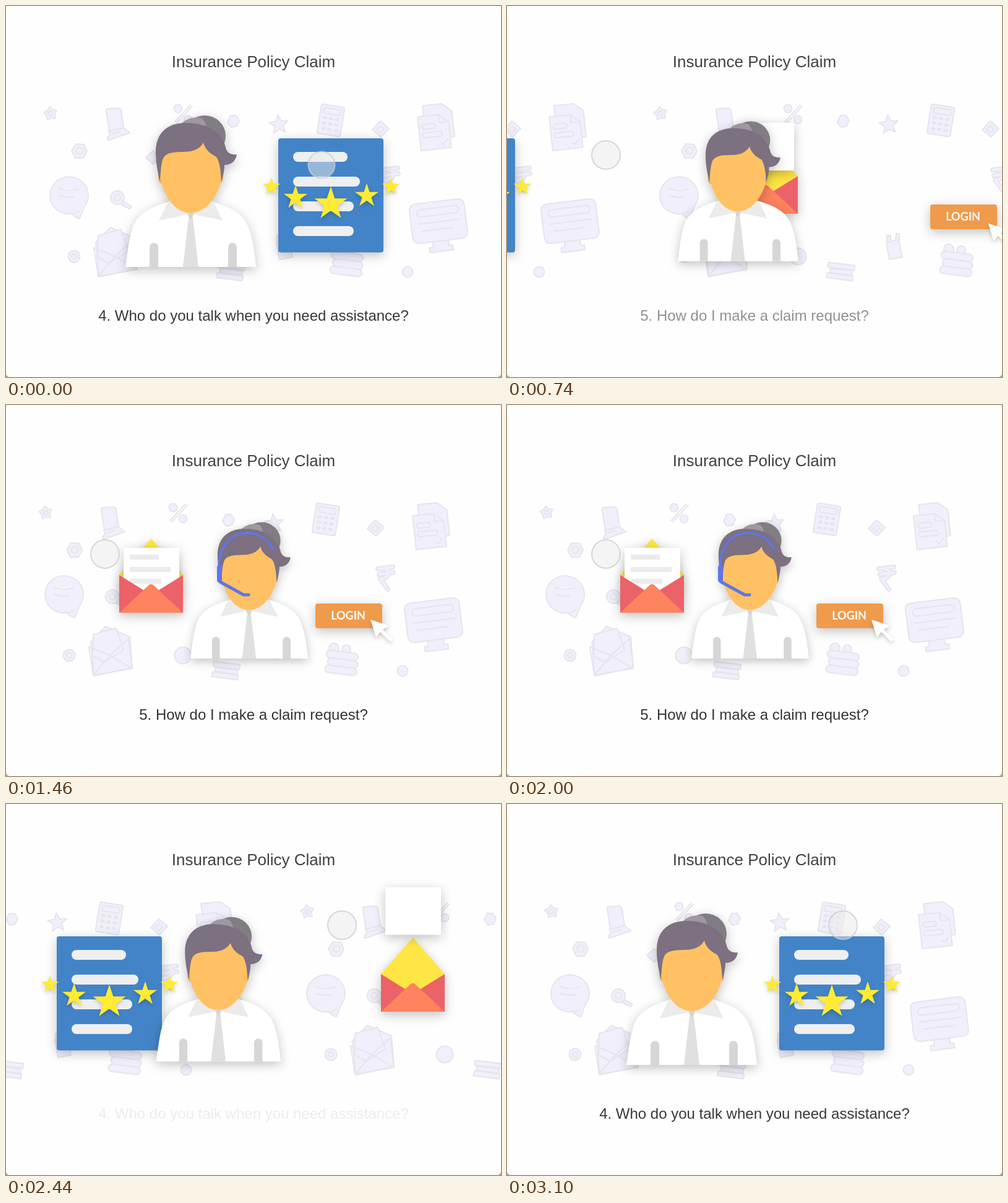
Recreate the animation shown at these times as an HTML page. Size 800 by 600 pixels, loop 3.12 s.

```html
<!DOCTYPE html>
<html lang="en">
<head>
<meta charset="utf-8">
<title>Insurance Policy Claim</title>
<style>
  html, body { margin: 0; width: 100%; height: 100%; overflow: hidden; background: #fefefe; }
  svg { display: block; width: 100%; height: 100%; }
  .copy { font-family: "Liberation Sans", Arial, sans-serif; text-anchor: middle; }
  .button { font: 700 18px Lato, sans-serif; text-anchor: middle; fill: #fff; }
  .lift { filter: drop-shadow(0 5px 9px rgba(0, 0, 0, .24)); }
  .hover { filter: drop-shadow(0 3px 3px rgba(0, 0, 0, .2)); }
  #icons { fill: #f1effb; stroke: #e6e4ec; stroke-width: 2; stroke-linejoin: round; stroke-linecap: round; }
  .line { fill: none; }
</style>
</head>
<body>
<svg viewBox="0 0 800 600">
  <defs>
    <g id="icons">
      <path id="flower"/>
      <circle cx="72" cy="174" r="3.5"/>
      <path d="M162 170q-1-4 3-4l16-1q4 0 5 4l4 28 10 8-34 12q-3-1-2-4l4-4zM165 203l24-6M171 207l13-4"/>
      <path d="M298 160l-25 27M301 162l-25 27"/>
      <circle cx="278" cy="166" r="6.5"/><circle cx="294" cy="184" r="6.5"/>
      <path d="M363 177l9 0 5 8-4 9-9 2-6-8z"/>
      <path id="outlineStar"/>
      <g transform="translate(525 185) rotate(9)">
        <rect x="-19" y="-24" width="38" height="48" rx="3"/>
        <rect x="-14" y="-19" width="28" height="9" rx="2"/>
        <path id="buttons" class="line" stroke-width="5"/>
      </g>
      <path d="M605 186l14 12-13 14-14-12zM605 194l6 5-6 6-6-5z"/>
      <g transform="rotate(-6 697 195)">
        <path d="M677 159h31l15 13v42h-46z"/>
        <path d="M667 176h34l15 13v42h-49zM701 176v13h15"/>
        <path d="M674 189h18q4 4 0 8h-18q-4-4 0-8zM674 203h28q4 4 0 8h-28q-4-4 0-8zM700 221l4 4 7-8" class="line"/>
      </g>
      <path d="M113 223l13 1 5 11-6 11-13 0-6-12z"/><circle cx="119" cy="234" r="5.5"/>
      <path d="M238 234l12 11-12 11-12-11z"/>
      <path d="M118 332a31 30 0 1 1 9-8l-8 20q-7-2-14-9M85 295q16 5 32 1M86 306q10 4 24 3"/>
      <path d="M190 316l13 8-3 4-14-7z"/>
      <circle cx="180" cy="310" r="11"/><circle cx="180" cy="310" r="5"/>
      <path d="M609 265l24-3M611 274l23-3M616 265q16 1 8 12-4 5-11 4l12 17" class="line" stroke-width="8"/>
      <path d="M609 265l24-3M611 274l23-3M616 265q16 1 8 12-4 5-11 4l12 17" class="line" stroke="#f1effb" stroke-width="4"/>
      <g transform="rotate(-7 699 353)">
        <path d="M686 376h26v13h6v8h-38v-8h6z"/>
        <rect x="655" y="316" width="89" height="64" rx="10"/>
        <rect x="666" y="326" width="68" height="12" rx="6"/>
        <path d="M666 349h68M672 361h50" class="line"/>
      </g>
      <path d="M145 383l24-25 39 17 4 50-62 13z"/>
      <path d="M149 371l37-10 12 35-31 20-19-10z"/>
      <path d="M142 391l34 14 30-27 6 48-63 11zM149 437l27-32 36 21" class="line"/>
      <circle cx="110" cy="405" r="9.5"/><circle cx="110" cy="405" r="4"/>
      <circle cx="294" cy="405" r="13.5"/>
      <g transform="rotate(7 363 428)">
        <rect x="342" y="417" width="43" height="8"/><rect x="346" y="426" width="36" height="7"/>
        <rect x="342" y="434" width="42" height="8"/>
      </g>
      <path d="M437 382l20-4 6 28-21 4zM438 381v-10h6v9M452 378l1-10 5 1v9"/>
      <circle cx="538" cy="393" r="8"/><circle cx="558" cy="395" r="7"/>
      <g transform="rotate(7 550 415)">
        <rect x="524" y="399" width="52" height="12" rx="6"/><rect x="528" y="411" width="49" height="12" rx="6"/>
        <rect x="525" y="423" width="52" height="12" rx="6"/>
      </g>
      <circle cx="649" cy="430" r="8.5"/>
    </g>
  </defs>

  <rect width="800" height="600" fill="#fefefe"/>
  <path d="M0 595v5h5q-4-1-5-5zM800 595v5h-5q4-1 5-5z" fill="#a5a5a5"/>
  <text class="copy" x="400" y="98.500" font-size="26" fill="#414141">Insurance Policy Claim</text>
  <text class="copy" id="talk" x="400" y="508.500" font-size="24" fill="#383838">4. Who do you talk when you need assistance?</text>
  <text class="copy" id="claim" x="400" y="508.500" font-size="24" fill="#333">5. How do I make a claim request?</text>

  <g id="track">
    <use href="#icons"/><use href="#icons" x="773"/>

    <g class="lift">
      <rect x="440" y="214" width="170" height="184.500" rx="4" fill="#4384c8"/>
    </g>
    <g fill="#efefef">
      <rect x="464" y="236" width="88" height="16" rx="8"/><rect x="464" y="276" width="108" height="16" rx="8"/>
      <rect x="464" y="316" width="98" height="16" rx="8"/><rect x="464" y="356" width="98" height="16" rx="8"/>
    </g>
    <path id="rating" class="hover" fill="#ffeb33"/>

    <g transform="translate(964 0)">
      <g class="lift">
        <path d="M0 275L51.500 216 103 275V336H0z" fill="#ffe645"/>
      </g>
      <g id="letter">
        <rect class="lift" x="7" width="90" height="77" fill="#fff"/>
        <g id="writing" fill="#ebebeb">
          <rect x="17" y="11" width="47" height="8"/><rect x="17" y="31" width="66" height="8"/>
          <rect x="17" y="50" width="51" height="8"/>
        </g>
      </g>
      <path d="M0 275L51.500 307 103 275V336H0z" fill="#eb6268"/>
      <path d="M0 336L48 291q3.500-3 7 0L103 336z" fill="#fe835f"/>
    </g>

    <g transform="translate(1281 0)">
      <rect class="lift" y="321" width="108" height="40" rx="4" fill="#f09a4c"/>
      <text class="button" x="53" y="347">LOGIN</text>
      <path id="cursor" class="hover" d="M89 347l9 29 7-9 16 16 4-4-16-16 10-6z" fill="#fff"/>
    </g>
  </g>

  <g id="person" class="lift">
    <ellipse cx="321" cy="210" rx="34" ry="33" fill="#827d84"/>
    <path d="M193 422C197 396 199 375 204 361 210 339 228 327 262 317H335C368 326 386 339 393 361 399 378 402 398 404 422z" fill="#fff"/>
    <path d="M262 316L247 347 298 336 350 347 335 316z" fill="#ebebeb"/>
    <path d="M295 343h7l9 79h-25z" fill="#e0e0e0"/>
    <path d="M293 335h11l-3 8q-2.500 3-5 0z" fill="#d6d6d6"/>
    <path d="M232 422V390a7 7 0 0 1 14 0V422zM359 422V390a7 7 0 0 1 14 0V422z" fill="#d6d6d6"/>
    <path d="M246 268h8v20q-7-1-8-9zM351 268h-8v20q7-1 8-9z" fill="#f8b552"/>
    <path d="M248.500 215V262C249 301 271 335 298 335S350 301 350 262V215z" fill="#ffc163"/>
    <path d="M283 191C292 181 306 178 317 182 322 187 324 193 323 200H283z" fill="#9f97a2"/>
    <path d="M248.500 284C245 266 242 254 242 236 242 208 258 190 288 189 322 188 350 203 355 229 357 238 364 241 373 240 371 252 363 257 353 257 353 268 350 277 348 285 347 266 346 254 340 244 331 239 322 233 319 221 312 233 300 236 285 236 266 236 256 239 253 249 250 259 250 272 248.500 284z" fill="#7c7081"/>
  </g>

  <g id="headset" fill="none" stroke="#6075ea" stroke-linecap="round" stroke-linejoin="round">
    <path d="M344 264C344 230 362 207 390 207 410 207 424 218 431 233" stroke-width="3.500"/>
    <path d="M345 263V283" stroke-width="8"/>
    <path d="M346 286L384 307H392" stroke-width="5"/>
  </g>

  <circle id="touch" fill="#ebebeb" fill-opacity=".5" stroke="#cbcbcb" stroke-opacity=".75" stroke-width="2"/>
</svg>

<script>
  const LOOP = 3120, STEP = 20, PAGE = 781;
  const el = id => document.getElementById(id);
  const clamp = v => Math.max(0, Math.min(1, v));

  // Keys are [time, value, velocity], joined by cubic Hermite curves.
  const scrollKeys = [
    [230, 0, 0], [440, 100, 1.05], [740, 597, 1.75], [1060, 774, .07], [1260, PAGE, 0],
    [2060, PAGE, 0], [2160, 760, -.6], [2440, 358, -2.3], [2700, 27, -.3], [2950, 0, 0]
  ];
  const fingerKeys = [[230, 510, 0], [440, 377, -1.1], [650, 160, 0], [2050, 160, 0], [2390, 543, 0]];

  function curve(keys, t) {
    const next = keys.findIndex(key => key[0] > t);
    if (next === 0) return keys[0][1];
    if (next < 0) return keys[keys.length - 1][1];
    const [t0, a, va] = keys[next - 1], [t1, b, vb] = keys[next];
    const d = t1 - t0, u = (t - t0) / d, w = 1 - u;
    return w * w * ((1 + 2 * u) * a + u * d * va) + u * u * ((1 + 2 * w) * b - w * d * vb);
  }

  function starPath(x, y, outer, inner, tilt = 0) {
    const points = Array.from({ length: 10 }, (_, i) => {
      const angle = i * Math.PI / 5 - Math.PI / 2 + tilt, r = i % 2 ? inner : outer;
      return (x + r * Math.cos(angle)).toFixed(1) + " " + (y + r * Math.sin(angle)).toFixed(1);
    });
    return "M" + points.join("L") + "z";
  }

  const ratings = [[429, 292, 15], [468, 310, 20], [525, 320, 28], [583, 307, 20], [622, 292, 15]];
  el("rating").setAttribute("d", ratings.map(([x, y, r]) => starPath(x, y, r, r * .39)).join(""));
  el("flower").setAttribute("d", starPath(72, 174, 11, 7, -.15));
  el("outlineStar").setAttribute("d", starPath(441, 192, 16, 7, -.1));
  el("buttons").setAttribute("d", [-3, 6, 15].flatMap(y => [-10, 0, 10].map(x => `M${x - 1} ${y}h2`)).join(""));

  const place = (id, value) => el(id).setAttribute("transform", value);

  function draw(t) {
    const scroll = curve(scrollKeys, t), p = scroll / PAGE, left = PAGE - scroll;
    place("track", `translate(${-scroll} 0)`);
    el("talk").setAttribute("opacity", clamp(1 - scroll / 390));
    el("claim").setAttribute("opacity", clamp((scroll - 390) / 384));

    place("letter", `translate(0 ${231 - .228 * left})`);
    const written = clamp((scroll - 620) / 140);
    place("writing", `translate(${17 * (1 - written)} 0) scale(${written} 1)`);
    place("cursor", `translate(${.025 * left} ${.025 * left})`);

    const x = 298.5 + .125 * Math.min(scroll, 774) - .35 * Math.max(0, scroll - 774);
    place("person", `translate(${x} ${422 - 12 * p}) scale(${1 - .1 * p}) translate(-298.5 -422)`);
    place("headset", `translate(${x - 392.8} ${-1.28 * left})`);
    el("headset").setAttribute("opacity", clamp((scroll - 610) / 50));

    const finger = curve(fingerKeys, t), back = t > 1500;
    const pressed = t < 650 || (t > 2050 && t < 2390);
    const touch = el("touch");
    touch.setAttribute("cx", finger);
    touch.setAttribute("cy", back ? 241 - 45 * (finger - 160) / 383 : 241 + 16 * (finger - 160) / 350);
    touch.setAttribute("r", pressed ? 21.5 : 23);
  }

  const start = performance.now();
  function tick() {
    const t = (performance.now() - start) % LOOP;
    draw(Math.floor(t / STEP) * STEP);
    requestAnimationFrame(tick);
  }
  tick();
</script>
</body>
</html>
```
